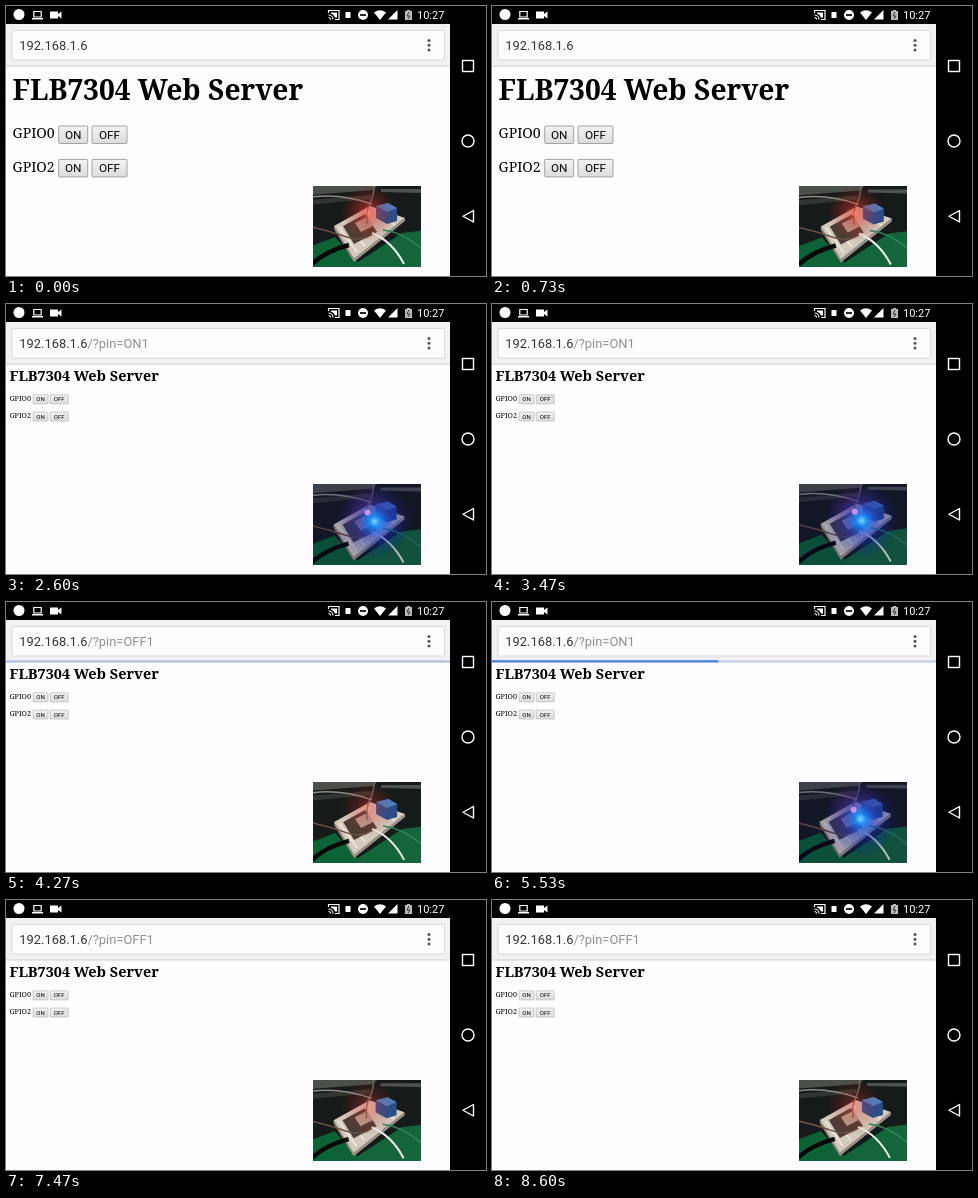
An HTML page that plays this animation: 480 px wide and 270 px high, repeating every 8670 ms.

```html
<!DOCTYPE html>
<html lang="en">
<head>
<meta charset="utf-8">
<title>Web server demo</title>
<style>
  html, body { margin: 0; width: 100%; height: 100%; overflow: hidden; background: #000; }
  svg { display: block; width: 100vw; height: 100vh; }
  text { font-family: Roboto, sans-serif; }
  .serif { font-family: "Noto Serif", serif; fill: #000; }
  .line { fill: none; stroke: #fff; }
</style>
</head>
<body>
<svg viewBox="0 0 480 270">
  <defs>
    <linearGradient id="buttonFill" x2="0" y2="1">
      <stop stop-color="#f3f2f4"/><stop offset="1" stop-color="#dcdcdd"/>
    </linearGradient>
    <radialGradient id="redGlow">
      <stop stop-color="#ff8a68" stop-opacity=".95"/>
      <stop offset=".14" stop-color="#ee3a30" stop-opacity=".6"/>
      <stop offset="1" stop-color="#a02018" stop-opacity="0"/>
    </radialGradient>
    <radialGradient id="blueGlow">
      <stop stop-color="#80d8ff"/>
      <stop offset=".14" stop-color="#148cff" stop-opacity=".9"/>
      <stop offset=".45" stop-color="#1838d8" stop-opacity=".45"/>
      <stop offset="1" stop-color="#1020a0" stop-opacity="0"/>
    </radialGradient>
    <clipPath id="photoClip"><rect x="307" y="180" width="108" height="81"/></clipPath>
  </defs>

  <rect width="480" height="270"/>
  <rect y="18" width="444" height="252" fill="#fefcff"/>

  <g id="page">
    <text class="serif" x="6.6" y="93.6" font-size="28.2" font-weight="700">FLB7304 Web Server</text>
  </g>

  <!-- Address bar -->
  <rect y="18" width="444" height="42" fill="#f2f0f3"/>
  <rect y="59.5" width="444" height="1" fill="#d2d0d4"/>
  <rect x="6" y="24.5" width="432.5" height="29.5" rx="1" fill="#fefcff" stroke="#dad8dc"/>
  <text x="13.3" y="44" font-size="12.9" fill="#333">192.168.1.6<tspan id="query" fill="#909090"></tspan></text>
  <g fill="#555">
    <circle cx="423" cy="34.5" r="1.5"/><circle cx="423" cy="39.3" r="1.5"/><circle cx="423" cy="44.1" r="1.5"/>
  </g>
  <g id="progress">
    <rect y="58.4" width="444" height="2" fill="#c3cfee"/>
    <rect id="bar" y="58.2" height="2.2" fill="#4d82d6"/>
  </g>

  <!-- Status bar -->
  <g fill="#fff">
    <circle cx="13" cy="8.5" r="5.5"/>
    <path d="M26 12h11v1.5h-11z"/>
    <path d="M44 5.5h8v2.5l3.5-2.5v7l-3.5-2.5v2.5h-8z"/>
    <path d="M325 6.5h6v5h-2q-1-3-4-4z"/>
    <rect x="339.5" y="6" width="5" height="6"/>
    <circle cx="357" cy="9" r="5"/>
    <path d="M368 6.5q6-4.5 12 0l-6 7.5z"/>
    <path d="M382 13.5l9.5-9.5v9.5z"/>
    <path d="M399 5h2v-1h3v1h2v9h-7z" fill="#bbb"/>
    <text x="411" y="13" font-size="11">10:27</text>
  </g>
  <path d="M354 9h6" stroke="#000" stroke-width="1.7"/>
  <path d="M403 6l-2 4h3l-2 3" fill="none" stroke="#333"/>
  <path class="line" d="M27.8 5.5h7.4v5.5h-7.4zM322.5 7V4.5h10.5v9h-4M322.5 9a4.5 4.5 0 0 1 4.5 4.5M322.5 11.5a2 2 0 0 1 2 2" stroke-width="1.2"/>

  <!-- Navigation -->
  <g class="line" stroke-width="1.4">
    <rect x="456.5" y="54.5" width="11" height="11"/>
    <circle cx="462" cy="135" r="6"/>
    <path d="M467.5 204.5v11.5l-10.5-5.75z" stroke-linejoin="round"/>
  </g>

  <!-- Circuit board photo -->
  <g clip-path="url(#photoClip)">
    <rect x="307" y="180" width="108" height="81" fill="#171a1a"/>
    <g id="scene">
      <path d="M303 177h70l-5 7-65 5z" fill="#4b5149"/>
      <path d="M303 194l62-5v4l-62 6z" fill="#303631"/>
      <path d="M375 183h45v4l-45-1z" fill="#4e5252"/>
      <path d="M303 241l26-10 22 24 14 11h-62z" fill="#0d6337"/>
      <path d="M420 224l-24 3-44 29v10h68z" fill="#14653b"/>
      <path d="M328 220l36-20 35 12-51 41z" fill="#d3c9bd"/>
      <path d="M328 220l20 33 51-41v3l-51 41-20-33z" fill="#9a9489"/>
      <path d="M333 221l18 25M339 218l20 22M374 208l15 11" fill="none" stroke="#ece3d6" stroke-width="2"/>
      <path d="M337 220l22-12 12 18-23 12z" fill="#4a3d36"/>
      <path d="M349 217l12-6 6 9-12 6z" fill="#b5a696"/>
      <path d="M370 200l12-3 9 5v13l-10 3-11-6z" fill="#23508f"/>
      <path d="M370 200l12-3 9 5-10 4z" fill="#4a84c8"/>
      <g fill="none" stroke-width="1.5">
        <path d="M306 258q14-13 37-19" stroke="#090909" stroke-width="4.5"/>
        <path d="M306 221q18 4 35 10t29-6" stroke="#6b4f42"/>
        <path d="M361 218q-1-14 3-21t4-18" stroke="#6b6a66"/>
        <path d="M306 191q28-4 60 7" stroke="#8d8c86"/>
        <path d="M366 227q20 8 32 31" stroke="#eeeee8" stroke-width="2"/>
        <path d="M377 224q20 2 40 20" stroke="#2c8558"/>
      </g>
      <circle id="red" cx="363" cy="207" r="28" fill="url(#redGlow)"/>
      <g id="blue">
        <rect x="300" y="174" width="122" height="94" fill="#080c48" opacity=".22"/>
        <circle cx="369" cy="217" r="38" fill="url(#blueGlow)"/>
        <circle cx="362" cy="208" r="3" fill="#ee9cf0" opacity=".8"/>
      </g>
    </g>
  </g>
</svg>

<script>
const LOOP = 8670;
const PAGE_SCALE = 0.514;
const PAGE_LOADED = 1900;
const FADE = 180;
const requests = [
  { label: "ON", press: 1450, start: 1528, url: 1720, end: 2150 },
  { label: "OFF", press: 3400, start: 3670, url: 3740, end: 4150 },
  { label: "ON", press: 4780, start: 4980, url: 5060, end: 6080 },
  { label: "OFF", press: 6480, start: 6680, url: 6800, end: 7280 }
];
const byId = id => document.getElementById(id);
const [page, query, progress, bar, scene, red, blue] =
  ["page", "query", "progress", "bar", "scene", "red", "blue"].map(byId);

function addSvg(tag, attributes, content = "") {
  const node = document.createElementNS("http://www.w3.org/2000/svg", tag);
  for (const [name, value] of Object.entries(attributes)) node.setAttribute(name, value);
  node.textContent = content;
  return page.appendChild(node);
}

function addButton(label, x, y, width) {
  const box = addSvg("rect", { x, y, width, height: 17.5, rx: 1, stroke: "#a3a3a3" });
  addSvg("text", { x: x + width / 2, y: y + 12.8, "font-size": 11.8, "text-anchor": "middle" }, label);
  return box;
}

function addRow(name, y) {
  addSvg("text", { class: "serif", x: 6.6, y: y + 12.4, "font-size": 14.1 }, name);
  return { ON: addButton("ON", 52.7, y, 29), OFF: addButton("OFF", 86, y, 35) };
}

const rows = [addRow("GPIO0", 120), addRow("GPIO2", 153.4)];
for (const row of rows) {
  for (const box of Object.values(row)) box.setAttribute("fill", "url(#buttonFill)");
}

function loadProgress(request, time) {
  const p = Math.min(1, (time - request.start) / (request.end - request.start));
  return p < 0.5 ? 0.51 * (1 - (1 - 2 * p) ** 2) : 0.51 + 0.49 * (2 * p - 1) ** 3;
}

function draw(time) {
  const current = requests.findLast(request => time >= request.url);
  const lit = current?.label === "ON";
  query.textContent = current ? `/?pin=${current.label}1` : "";
  page.setAttribute("transform",
    time < PAGE_LOADED ? "" : `translate(0 60) scale(${PAGE_SCALE}) translate(0 -60)`);

  const loading = requests.find(r => time >= r.start && time < r.end + FADE);
  bar.setAttribute("width", loading ? 444 * loadProgress(loading, time) : 0);
  progress.setAttribute("opacity", loading ? Math.min(1, 1 - (time - loading.end) / FADE) : 0);

  const pressed = requests.find(r => time >= r.press && time < r.press + 260);
  for (const label of ["ON", "OFF"]) {
    rows[0][label].setAttribute("fill", pressed?.label === label ? "#dfdee0" : "url(#buttonFill)");
  }

  const phase = time / LOOP * 2 * Math.PI;
  scene.setAttribute("transform", `translate(${Math.sin(3 * phase) * 0.8} ${Math.sin(4 * phase) * 0.6})`);
  blue.setAttribute("opacity", lit ? 1 : 0);
  red.setAttribute("opacity", current ? 0.6 : 0.95);
}

function tick() {
  draw(performance.now() % LOOP);
  requestAnimationFrame(tick);
}
tick();
</script>
</body>
</html>
```
